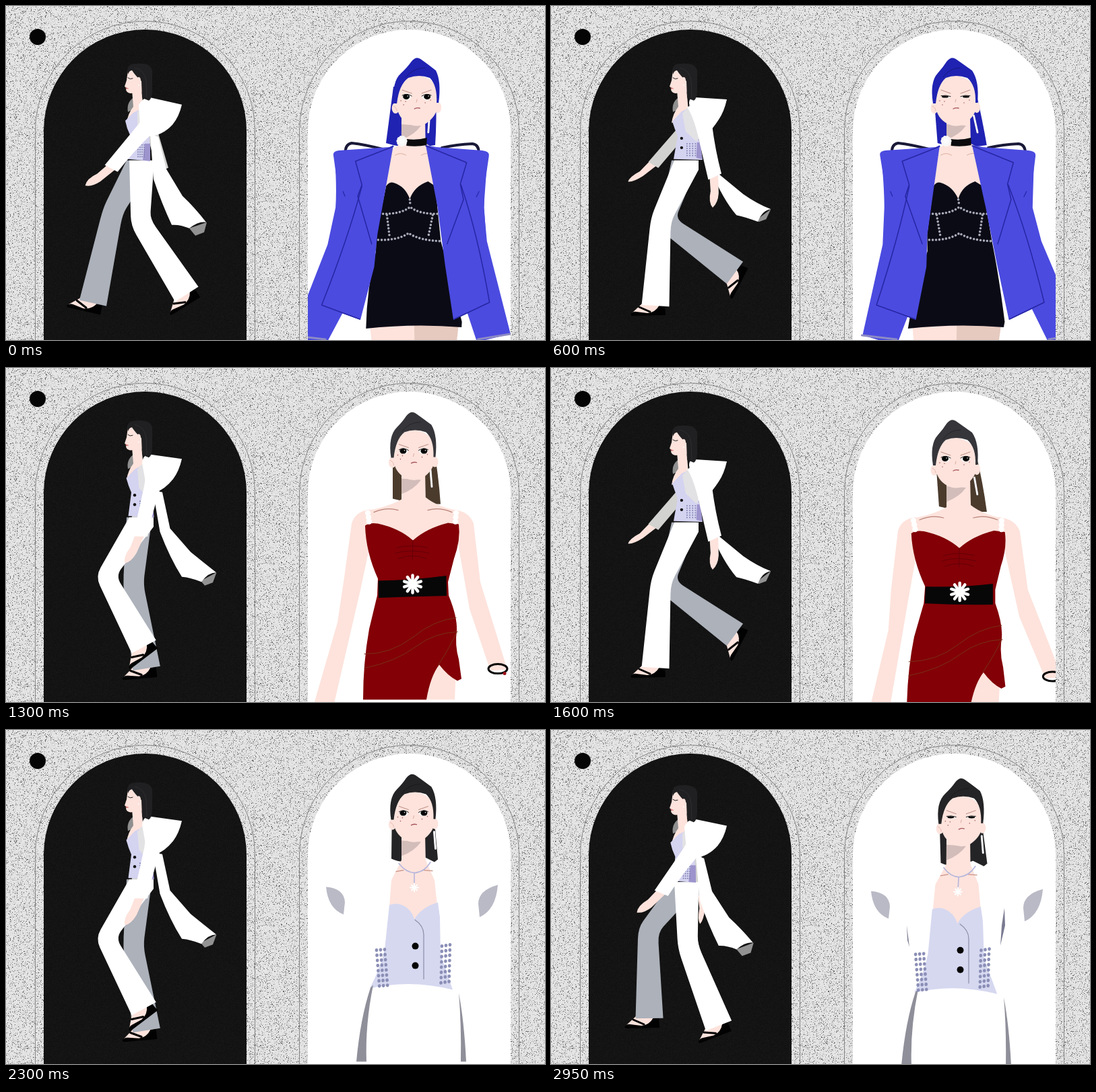
An HTML page with a canvas that plays this animation: 800 px wide and 497 px high, repeating every 3000 ms.

```html
<!DOCTYPE html>
<html lang="en">
<head>
<meta charset="utf-8">
<title>Runway walk</title>
<style>
html, body { margin: 0; width: 100%; height: 100%; overflow: hidden; background: #e2e2e2; }
canvas { display: block; width: 800px; height: 497px; }
</style>
</head>
<body>
<canvas id="stage" width="800" height="497"></canvas>
<script>
const W = 800, H = 497, LOOP = 3000, STEP = 50, TAU = Math.PI * 2;
const g = document.getElementById('stage').getContext('2d');
const SKIN = '#fde3dc', INK = '#0b0b16';
const lerp = (a, b, k) => a + (b - a) * k;
const mix = (p, q, k) => [lerp(p[0], q[0], k), lerp(p[1], q[1], k)];

function random(seed) {
  return () => (seed = (seed * 1664525 + 1013904223) >>> 0) / 4294967296;
}

// Drawing helpers: paths are strings of "x,y" pairs, optionally bent by a warp.
let bend = null;
const at = (x, y) => bend ? bend(x, y) : [x, y];
const path = d => new Path2D(d.replace(/(-?[\d.]+),(-?[\d.]+)/g, (_, x, y) => at(+x, +y).join(',')));
function fill(d, color) {
  g.fillStyle = color;
  g.fill(path(d));
}
function line(d, color, width = 1, dash = []) {
  g.strokeStyle = color;
  g.lineWidth = width;
  g.lineCap = g.lineJoin = 'round';
  g.setLineDash(dash);
  g.stroke(path(d));
  g.setLineDash([]);
}
function dot(x, y, rx, color, ry = rx) {
  const p = at(x, y);
  g.fillStyle = color;
  g.beginPath();
  g.ellipse(p[0], p[1], rx, ry, 0, 0, TAU);
  g.fill();
}
function morph(a, b, k) {
  const n = b.match(/-?[\d.]+/g);
  let i = 0;
  return a.replace(/-?[\d.]+/g, v => lerp(+v, +n[i++], k).toFixed(2));
}
function turned(x, y, deg, draw) {
  g.save();
  g.translate(x, y);
  g.rotate(deg * Math.PI / 180);
  draw();
  g.restore();
}
// Sideways sway per height: stops are [y, amount].
function swayer(stops, sway, lift) {
  return (x, y) => {
    let i = 1;
    while (i < stops.length - 1 && y > stops[i][0]) i++;
    const [y0, a] = stops[i - 1], [y1, b] = stops[i];
    const k = Math.min(1, Math.max(0, (y - y0) / (y1 - y0)));
    return [x + sway * lerp(a, b, k), y + lift];
  };
}

// Still backdrop
function arch(c, x, top, r) {
  c.beginPath();
  c.moveTo(x, H + 4);
  c.lineTo(x, top + r);
  c.arc(x + r, top + r, r, Math.PI, 0);
  c.lineTo(x + 2 * r, H + 4);
  c.closePath();
}
function makeBackdrop() {
  const cv = document.createElement('canvas');
  cv.width = W;
  cv.height = H;
  const c = cv.getContext('2d'), rnd = random(7);
  const speckle = pick => {
    const im = c.createImageData(W, H);
    for (let i = 0; i < im.data.length; i += 4) {
      im.data[i] = im.data[i + 1] = im.data[i + 2] = pick();
      im.data[i + 3] = 255;
    }
    return im;
  };
  const stone = () => {
    const k = rnd();
    if (k < 0.08) return 75 + rnd() * 75;
    return k < 0.2 ? 170 + rnd() * 40 : 222 + rnd() * 12;
  };
  const dark = document.createElement('canvas');
  dark.width = W;
  dark.height = H;
  dark.getContext('2d').putImageData(speckle(() => 16 + rnd() * 7), 0, 0);
  c.putImageData(speckle(stone), 0, 0);
  c.strokeStyle = '#858585';
  c.lineWidth = 1;
  for (const x of [43.5, 435.5]) {
    arch(c, x, 22.5, 163);
    c.stroke();
  }
  c.fillStyle = c.createPattern(dark, 'repeat');
  arch(c, 56, 35, 150.5);
  c.fill();
  c.fillStyle = '#fff';
  arch(c, 448, 35, 150.5);
  c.fill();
  c.fillStyle = '#050505';
  c.beginPath();
  c.arc(47, 46, 12, 0, TAU);
  c.fill();
  return cv;
}
const backdrop = makeBackdrop();

// One stride: phase, knee x y, hem x y, foot angle
const STRIDE = [
  [0, 160, 306, 130, 443, 14],
  [0.05, 163, 318, 155, 446, 0],
  [0.2, 183, 322, 195, 448, 0],
  [0.4, 203, 322, 249, 440, -20],
  [0.45, 198, 322, 259, 428, -30],
  [0.5, 198, 322, 270, 427, -33],
  [0.55, 171, 323, 273, 397, -62],
  [0.72, 150, 312, 216, 412, -42],
  [0.9, 144, 298, 146, 429, 0],
  [0.95, 151, 304, 135, 438, 8]
];
function stride(s) {
  s = (s % 1 + 1) % 1;
  const n = STRIDE.length;
  const key = i => {
    const k = STRIDE[(i + n) % n];
    return [k[0] + Math.floor(i / n), ...k.slice(1)];
  };
  let i = n - 1;
  while (key(i)[0] > s) i--;
  const [a, b, c, d] = [key(i - 1), key(i), key(i + 1), key(i + 2)];
  const h = c[0] - b[0], k = (s - b[0]) / h, k2 = k * k, k3 = k2 * k;
  return b.slice(1).map((v, j) => {
    j++;
    const m0 = (c[j] - a[j]) / (c[0] - a[0]) * h, m1 = (d[j] - b[j]) / (d[0] - b[0]) * h;
    return v * (2 * k3 - 3 * k2 + 1) + m0 * (k3 - 2 * k2 + k) + c[j] * (3 * k2 - 2 * k3) + m1 * (k3 - k2);
  });
}
function across(from, to, w) {
  const dx = to[0] - from[0], dy = to[1] - from[1], l = Math.hypot(dx, dy);
  return [dy / l * w, -dx / l * w];
}
function leg(s, hipX, hipY, color) {
  const [kx, ky, hx, hy, rot] = stride(s);
  turned(hx, hy, rot, () => {
    fill('M-19,-4 L-35,11 L10,13 L11,-4Z', SKIN);
    fill('M-37,13 Q-34,8 -28,9 L-12,11 Q0,10 6,-1 L14,-2 L15,14 L-35,15Z', '#020202');
    line('M-24,2 L-8,9', '#020202', 3);
  });
  const hip = [hipX, hipY], knee = [kx, ky], hem = [hx, hy];
  const kn = across(hip, hem, 15), hn = across(knee, hem, 20.5);
  const add = (p, v, k) => [p[0] + v[0] * k, p[1] + v[1] * k];
  const side = k => {
    const top = k < 0 ? [hipX - 16, hipY] : [hipX + 20, hipY + 14];
    const mid = add(knee, kn, k), low = add(hem, hn, k);
    return [top, mix(top, mid, 0.85), mid, mix(mid, low, 0.12), low];
  };
  const l = side(-1), r = side(1);
  fill(`M${l[0]} L${l[1]} Q${l[2]} ${l[3]} L${l[4]} L${r[4]} L${r[3]} Q${r[2]} ${r[1]} L${r[0]} L${[hipX + 20, hipY]}Z`, color);
}

function walker(u) {
  const c = Math.cos(TAU * (u - 0.05)), w = (1 - c) / 2;
  const lift = 4 * (Math.cos(2 * TAU * (u - 0.07)) - 0.97);
  const blend = (a, b, color) => fill(morph(a, b, w), color);
  bend = null;

  turned(200, 165 + lift, 14 - 29 * c, () => {
    fill('M4,82 L3,106 Q-3,122 0,129 Q6,125 11,108 L16,82Z', SKIN);
    fill('M2,6 L3,87 L20,84 L18,0Z', '#d2d3d0');
  });
  leg(u - 0.05, 195, 230 + lift, '#acb1ba');

  g.save();
  g.translate(0, lift);
  blend('M272,331 L281,342 L294,337 L298,322Z', 'M306,318 L309,321 L320,317 L327,302Z', '#929292');
  blend('M214,190 L219,258 Q231,294 246,326 Q258,325 272,331 Q286,320 297,322 Q280,300 262,283 L238,243 L226,195Z',
    'M222,190 L238,245 Q256,288 276,311 Q290,314 308,321 Q314,304 327,302 Q306,294 286,280 L249,250 L238,190Z', '#fff');
  g.restore();

  leg(u - 0.55, 199, 230 + lift, '#fff');

  g.save();
  g.translate(0, lift);
  fill('M193,134 Q178,142 181,158 L193,152Z', '#8f8f8f');
  fill('M187,126 L201,120 L204,158 L188,172 L179,174 Q181,160 189,150Z', SKIN);
  blend('M189,159 L177,171 Q179,182 184,192 L181,228 L214,231 L213,198 L207,150Z',
    'M194,157 L180,172 Q184,184 188,194 L182,228 L225,229 L219,195 L208,150Z', '#d4d3f0');
  blend('M206,205 L214,205 L214,231 L203,230Z', 'M217,203 L222,203 L225,228 L216,226Z', '#9d94cd');
  for (let i = 0; i < 24; i++) {
    const col = i % 4, row = Math.floor(i / 4);
    dot(lerp(196, 202, w) + col * lerp(3, 4.2, w), lerp(207, 205, w) + row * 3.5, 1, '#8082b2');
  }
  for (const y of [197, 211]) dot(lerp(188, 194, w), y, 2.2, '#111');
  blend('M195,158 L205,145 L212,195 L204,199 L195,185Z', 'M195,160 L207,147 L226,188 L216,202 L200,187Z', '#e2e2e4');
  blend('M197,147 Q203,137 212,136 L261,147 Q257,165 247,177 Q232,193 213,194 L199,180Z',
    'M207,152 Q202,140 210,136 L261,139 Q257,157 249,169 Q240,183 232,191 L218,190 L209,170Z', '#fff');
  turned(212, 160, 14 + 27 * c, () => {
    fill('M4,96 L1,118 Q-6,134 -1,143 Q8,138 12,124 L17,96Z', SKIN);
    fill('M-8,-12 Q-3,0 -1,24 L1,101 L22,96 Q20,60 23,22 L16,-6Z', '#fff');
  });

  // Head in profile
  fill('M181,96 L179,111 L176,120 L179,122 L178,125 Q180,131 187,130 L202,128 L202,100 L190,92Z', SKIN);
  fill('M180,97 Q180,86 193,86 Q214,84 217,96 L217,125 Q217,138 212,141 L202,137 L201,112 Q192,104 187,96 Q183,96 181,102Z', '#202022');
  line('M191,92 Q206,95 208,112 L209,136', '#2e2e30', 1);
  dot(197, 111, 3, SKIN, 5);
  dot(197, 118, 1, '#fff');
  line('M181,107 Q184,110 188,108', '#222', 1);
  line('M178,122 L181,123', '#d9736f', 1.5);
  g.restore();
}

// Front figure
const HEAD_SWAY = [[88, 7.4], [118, 4.7]];
function backHair(color, shift, sway, lift, d) {
  bend = swayer([[140, 4], [200, shift]], sway, lift);
  fill(d, color);
}
function neck() {
  fill('M587,165 L622,165 L623,212 L587,212Z', SKIN);
  fill('M587,176 L616,178 Q606,192 587,199Z', '#d3bdba');
}
function head(hair, sway, lift, blink) {
  bend = swayer(HEAD_SWAY, sway + 0.95, lift);
  dot(569, 152, 5.5, SKIN, 8);
  dot(632, 151, 5, SKIN, 8);
  line('M566,149 Q571,151 571,156', '#e5b9b0', 1);
  fill('M569,120 Q600,88 631,120 L632,148 Q630,164 614,175 Q601,182 588,175 Q572,166 571,148Z', SKIN);
  fill('M567,145 Q562,113 574,100 Q582,91 587,83 Q594,74 601,79 Q611,86 625,96 Q636,112 633,144 L630,144 Q631,118 618,107 Q601,101 586,107 Q574,117 571,145Z', hair);
  line('M582,106 Q591,92 608,92', 'rgba(0,0,0,.3)', 1);
  for (const [x, k] of [[586, -1], [615, 1]]) {
    dot(x, 135, 6.5, '#fff', 4.5 * blink);
    dot(x + k, 135, 5, '#050505', 4 * blink);
    dot(x + k + 2, 134, 0.8, '#fff', 0.8 * blink);
    line(`M${x - 7 * k},${135 - blink} Q${x},${134 - 5 * blink} ${x + 7 * k},${134 - blink}`, '#111', 1);
    line(`M${x - 7 * k},130 L${x + 7 * k},125`, '#b98a80', 1);
  }
  line('M601,139 L600,143', '#dcaaa2', 1);
  line('M597,153 Q601,151 605,152', '#a8545a', 1.3);
  for (const [x, y] of [[577, 141], [584, 142], [581, 147], [613, 144], [621, 140]]) dot(x, y, 0.8, '#a3555a');
}
function earring(x) {
  line(`M${x},163 L${x + 2},188`, '#cfcfd6', 3);
  line(`M${x},163 L${x + 2},188`, '#fff', 2);
}

function blueLook(c, lift, blink) {
  const body = swayer([[205, 0], [260, -1.5], [320, -4], [365, -5], [480, 2.3]], c, lift);
  const coat = swayer([[205, -1], [290, -2], [460, -8]], c, lift);
  const sleeve = swayer([[205, -1], [290, -2], [497, -20]], c, lift);
  const dark = '#2626a4', blue = '#4b4be0';
  backHair('#2022b2', -5, c, lift, 'M571,120 L569,204 Q600,214 642,207 Q640,170 634,125Z');
  earring(628);
  bend = body;
  neck();
  fill('M587,204 L622,204 L650,220 L642,300 L560,300 L566,218Z', SKIN);
  line('M578,222 Q586,217 594,222 M617,222 Q625,217 632,221', '#dcae9f', 1);
  fill('M538,474 L604,474 L604,505 L541,505Z', SKIN);
  fill('M604,474 L670,474 L666,505 L604,505Z', '#e6cabf');
  fill('M566,268 Q571,261 577,263 Q594,268 602,287 Q608,268 628,261 L639,268 L650,350 Q662,400 675,470 L674,478 Q604,472 532,480 Q537,420 554,365 L554,340Z', INK);
  const beads = d => line(d, '#a9abb8', 3.6, [0, 5]);
  beads('M558,309 Q588,311 603,299 Q618,311 650,309');
  beads('M557,348 Q586,349 602,338 Q618,349 652,350');
  beads('M569,311 L574,345');
  beads('M637,311 L631,345');
  beads('M602,288 L603,296');
  bend = swayer([[190, 1], [215, 0]], c, lift);
  fill('M594,198 Q610,200 624,196 L624,207 Q610,210 594,208Z', '#0b0b0e');
  dot(587, 201, 7.5, '#fbfbfb');
  for (let i = 0; i < 10; i++) dot(587 + 6 * Math.cos(i * TAU / 10), 201 + 6 * Math.sin(i * TAU / 10), 2.2, '#f7f7f7');
  bend = coat;
  line('M505,219 Q504,206 514,204 Q533,206 560,213 M703,219 Q703,206 693,205 Q670,206 648,211', '#191937', 4);
  bend = sleeve;
  fill('M489,222 Q493,270 492,300 L485,355 L444,490 L494,505 L528,430 L528,250Z', blue);
  fill('M716,222 L712,300 L721,350 L768,488 L719,500 L690,430 L684,250Z', blue);
  line('M443,490 L494,496 M768,488 L720,496', '#8d8bc4', 3);
  bend = coat;
  fill('M487,221 Q487,216 495,215 L570,210 L576,207 L555,340 L552,388 L534,467 L475,446 L494,370 L494,268Z', blue);
  fill('M624,207 L640,210 L708,215 Q719,216 718,223 L712,268 L712,300 L726,442 L672,467 L657,385 L643,300Z', blue);
  line('M576,209 L520,231 L530,266 L524,283 L547,354', dark, 1.5);
  line('M624,208 L685,233 L676,265 L681,288 L659,354', dark, 1.5);
  line('M530,268 Q512,345 476,445 L533,466 M677,266 Q704,340 725,441 L673,466', dark, 1.5);
  line('M502,276 L505,283 M704,276 L700,284', dark, 1.2);
  head('#2022b2', c, lift, blink);
}

function redLook(c, lift, blink) {
  const body = swayer([[205, 0], [245, -1.8], [330, -3.5], [400, 0], [490, 2]], c, lift);
  const arms = swayer([[215, -1], [260, -2.5], [330, -4], [470, -16]], c, lift);
  const fold = '#793016';
  backHair('#4b3b2c', -2, c, lift, 'M574,125 L574,206 L608,214 L645,214 Q642,170 634,125Z');
  earring(630);
  bend = arms;
  fill('M540,222 Q518,225 513,243 L501,330 L492,390 L456,515 L486,515 L526,342 L538,285 L566,240Z', SKIN);
  fill('M664,222 Q688,225 694,243 L704,330 L744,460 L719,462 L688,370 L670,268 L640,240Z', SKIN);
  g.strokeStyle = '#080808';
  g.lineWidth = 3;
  g.beginPath();
  g.ellipse(...at(730, 459), 14, 7, 0, 0, TAU);
  g.stroke();
  dot(740, 466, 2.5, '#9a1016');
  bend = body;
  neck();
  fill('M587,200 L587,207 Q566,219 533,224 L540,270 L668,270 L672,224 Q640,218 623,204Z', SKIN);
  line('M546,226 Q565,218 582,223 M626,223 Q643,218 662,226', '#b98278', 1.2);
  fill('M640,440 L668,460 L666,505 L615,505Z', SKIN);
  fill('M533,246 Q540,241 552,243 Q584,250 604,268 Q624,250 656,242 L672,244 Q675,267 665,295 L656,330 L657,350 Q670,382 669,402 Q666,424 672,445 L676,474 L670,477 Q656,470 643,453 Q630,470 624,505 L530,505 Q530,450 539,400 L551,350 L552,325 Q534,285 533,246Z', '#820006');
  line('M668,383 Q634,387 604,412 Q572,437 532,437 M670,404 Q636,405 608,426 Q580,448 532,458 M669,404 Q661,423 642,453', fold, 1);
  line('M604,268 L603,296 M580,279 Q602,273 626,279 M578,287 Q600,280 628,287 M582,295 Q604,287 624,295', '#640006', 1);

  // The belt tips with the hips
  bend = (x, y) => [x, y + lift];
  fill(morph('M549,331 Q600,328 651,320 L652,349 Q600,350 551,357Z',
    'M556,325 Q606,327 656,321 L656,352 Q606,353 555,350Z', (1 - c) / 2), '#070707');
  bend = body;
  const [x, y] = at(603.5, 333);
  bend = null;
  for (let i = 0; i < 10; i++) turned(x, y, i * 36, () => line('M0,-5 L0,-13', '#fff', 4.5));
  dot(x, y, 6, '#fff');
  bend = body;
  for (let i = 0; i < 3; i++) {
    dot(537 + i, 227 + i * 6.5, 4.2, '#fff');
    dot(668 - i * 0.5, 227 + i * 6.5, 4.2, '#fff');
  }
  head('#35353a', c, lift, blink);
}

function whiteLook(c, lift, blink) {
  const body = swayer([[205, 0], [270, -4], [340, -3], [395, -1]], c, lift);
  const hang = swayer([[205, -2], [340, -11]], c, lift);
  const lilac = '#d6d8f0', grey = '#8f8f9a';
  backHair('#242426', 8, c, lift, 'M573,125 L572,203 Q585,209 598,207 L620,200 L636,208 L641,204 L634,125Z');
  bend = body;
  neck();
  fill('M588,203 L622,203 L636,235 L643,300 L567,300 L572,235Z', SKIN);
  line('M579,222 L590,220 M620,220 L633,221', '#c99287', 1.2);
  line('M583,210 Q594,224 607,224 Q622,222 630,208 M606,224 L606,240', '#b5b5dc', 1.6);
  line('M606,240 L606,252 M600,246 L612,246 M602,242 L610,250 M610,242 L602,250', '#fff', 2);
  fill('M569,272 Q579,268 588,272 Q602,278 606,293 Q617,275 641,268 L644,290 L645,345 L663,398 Q600,382 540,396 Q556,365 562,338Z', lilac);
  bend = swayer([[290, 0], [400, 0]], c, lift);
  line('M607,294 Q620,303 620,316 L620,382', '#8c8ea6', 1.2);
  dot(607.5, 333, 5, '#050505');
  dot(607.5, 362, 5, '#050505');
  fill('M541,395 L545,391 Q533,450 535,505 L520,505 Q526,440 541,395Z', grey);
  fill('M672,403 Q680,445 683,505 L675,505 Q676,450 672,403Z', grey);
  fill('M475,245 Q502,247 503,268 L501,286 Q478,277 475,245Z', '#b9bac5');
  fill('M730,242 Q701,250 701,270 L703,290 Q727,279 730,242Z', '#b9bac5');
  // Coat gaps open on alternating sides
  g.globalAlpha = Math.max(0, -c);
  fill('M530,266 L539,300 L536,312 L529,292Z', '#46466a');
  g.globalAlpha = Math.max(0, c);
  fill('M673,270 L674,296 L667,326 L669,296Z M528,296 L532,328 L529,318Z', '#5c5c78');
  g.globalAlpha = 1;
  bend = hang;
  for (let i = 0; i < 24; i++) {
    const col = i % 3, row = Math.floor(i / 3);
    dot(550 + col * 6 + row * 0.6, 339 + row * 7.6 + col * -0.5, 2.3, '#8b8fb6', 2.6);
    dot(647 + col * 6 - row * 0.2, 333 + row * 7.8 - col, 2.3, '#8b8fb6', 2.6);
  }
  head('#242426', c, lift, blink);
  earring(631);
}

function frame(ms) {
  const t = Math.floor(ms % LOOP / STEP) * STEP;
  const u = t < 600 ? lerp(0.04, 0.6, t / 600) : t % 1000 / 1000;
  const c = Math.cos(TAU * (u - 0.05));
  const lift = 6 * (Math.cos(2 * TAU * (u - 0.07)) - 0.93);
  const blink = (t >= 550 && t <= 650) || t >= 2900 ? 0.4 : 1;
  const look = t < 1050 ? blueLook : t < 2050 ? redLook : whiteLook;

  g.drawImage(backdrop, 0, 0);
  walker(u);
  g.save();
  arch(g, 448, 35, 150.5);
  g.clip();
  look(c, lift, blink);
  g.restore();
  bend = null;
}

const start = performance.now();
function tick() {
  frame(performance.now() - start);
  requestAnimationFrame(tick);
}
tick();
</script>
</body>
</html>
```
